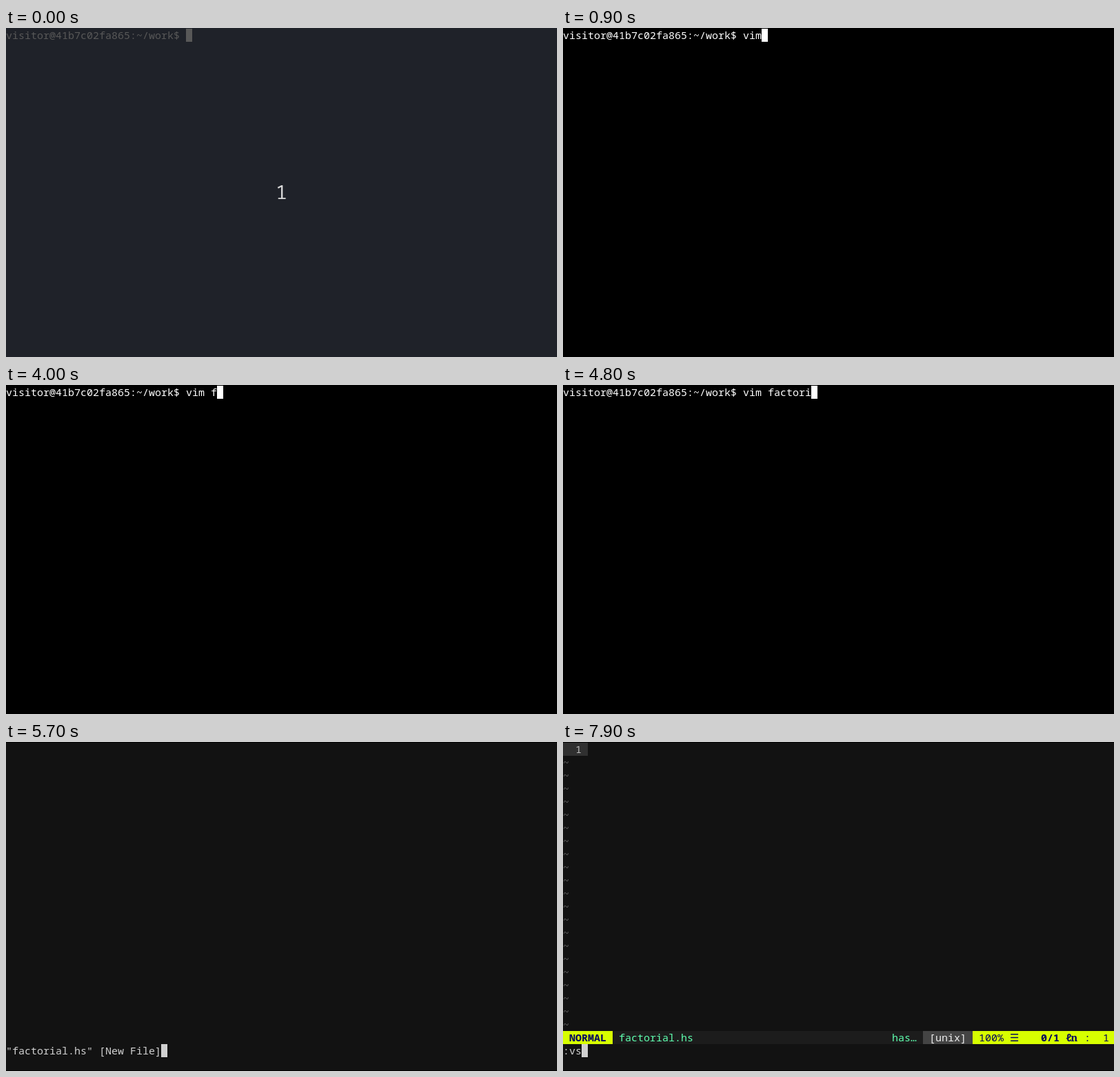
Recreate the animation shown at these times as an HTML page. Size 799x477 px, loop 8000 ms.

```html
<!DOCTYPE html>
<html lang="en">
<head>
<meta charset="utf-8">
<title>Terminal session</title>
<style>
  html, body { margin: 0; width: 100%; height: 100%; overflow: hidden; background: #000; }
  svg { display: block; width: 799px; height: 477px; }
  text { font-family: "Noto Sans Mono", "DejaVu Sans Mono", "DejaVu Sans", monospace; font-size: 15px; white-space: pre; }
</style>
</head>
<body>
<svg id="stage" viewBox="0 0 799 477"></svg>
<script>
const LOOP = 8000, CELL_W = 9, CELL_H = 19, TOP = 1;
const PROMPT = "visitor@41b7c02fa865:~/work$ ";
const COMMAND = "vim factorial.hs";
const MESSAGE = '"factorial.hs" [New File]';
const LIME = "#d7ff00", NAVY = "#00005f", MINT = "#5fffaf", PALE = "#d0d0d0";

// [time, number of command characters typed]
const TYPING = [[700, 2], [900, 3], [2600, 4], [4000, 5], [4100, 6], [4300, 7],
  [4500, 8], [4600, 9], [4700, 10], [4800, 11], [4900, 13],
  [5100, 14], [5300, 15], [5400, 16]];
const COLON_TYPING = [[7300, 1], [7800, 2], [7900, 3]];

const stage = document.getElementById("stage");

const typed = (steps, t) => steps.reduce((n, [at, count]) => t >= at ? count : n, 0);

const rect = (x, y, w, h, fill) =>
  `<rect x="${x}" y="${y}" width="${w}" height="${h}" fill="${fill}"/>`;

const block = (col, row, cols, fill) =>
  rect(col * CELL_W, TOP + row * CELL_H, cols * CELL_W, CELL_H, fill);

const write = (col, row, str, fill, attrs = "") =>
  `<text x="${col * CELL_W}" y="${TOP + row * CELL_H + 15}" fill="${fill}" ${attrs}>${str}</text>`;

const BOLD = 'font-weight="700"';

function shell(t) {
  const line = PROMPT + COMMAND.slice(0, typed(TYPING, t));
  const cursor = t < 5600 ? block(line.length, 0, 1, "#fff") : block(0, 1, 1, "#fff");
  return rect(0, 0, 799, 477, "#000") + write(0, 0, line, "#fff") + cursor;
}

function countdown() {
  return rect(0, 0, 799, 477, "#1f2229") +
    write(0, 0, PROMPT, "#585858") + block(PROMPT.length, 0, 1, "#585858") +
    '<text x="399.5" y="248" text-anchor="middle" fill="#d8d8d8" style="font-size:28px">1</text>';
}

function statusBar() {
  const row = 22;
  return block(0, row, 8, LIME) + block(8, row, 50, "#1c1c1c") +
    block(58, row, 8, "#444") + block(66, row, 23, LIME) +
    write(1, row, "NORMAL", NAVY, BOLD) +
    write(9, row, "factorial.hs", MINT) + write(53, row, "has…", MINT) +
    write(59, row, "[unix]", "#eee") +
    write(67, row, "100%", NAVY) + write(72, row, "☰", NAVY) +
    write(77, row, "0/1", NAVY, BOLD) +
    write(81, row, "ℓ", NAVY, BOLD) +
    write(81.8, row, "n", NAVY, `${BOLD} style="font-family:'Noto Serif',serif"`) +
    write(84, row, ":", NAVY) + write(87, row, "1", NAVY);
}

function editor(t) {
  let out = rect(0, 0, 799, 477, "#000") + rect(0, 1, 799, 475, "#121212");
  if (t < 6000) {
    return out + write(0, 23, MESSAGE, PALE) + block(MESSAGE.length, 23, 1, PALE);
  }
  out += block(0, 0, 4, "#303030") + write(2, 0, "1", "#bcbcbc");
  for (let row = 1; row <= 21; row++) out += write(0, row, "~", "#626262");
  const entry = ":vs".slice(0, typed(COLON_TYPING, t));
  return out + statusBar() + write(0, 23, entry || MESSAGE, PALE) +
    (entry ? block(entry.length, 23, 1, PALE) : block(4, 0, 1, PALE));
}

function scene(t) {
  if (t < 500) return countdown();
  return t < 5700 ? shell(t) : editor(t);
}

const start = performance.now();
let shown = "";
function draw() {
  const markup = scene((performance.now() - start) % LOOP);
  if (markup !== shown) stage.innerHTML = shown = markup;
  requestAnimationFrame(draw);
}
draw();
</script>
</body>
</html>
```
